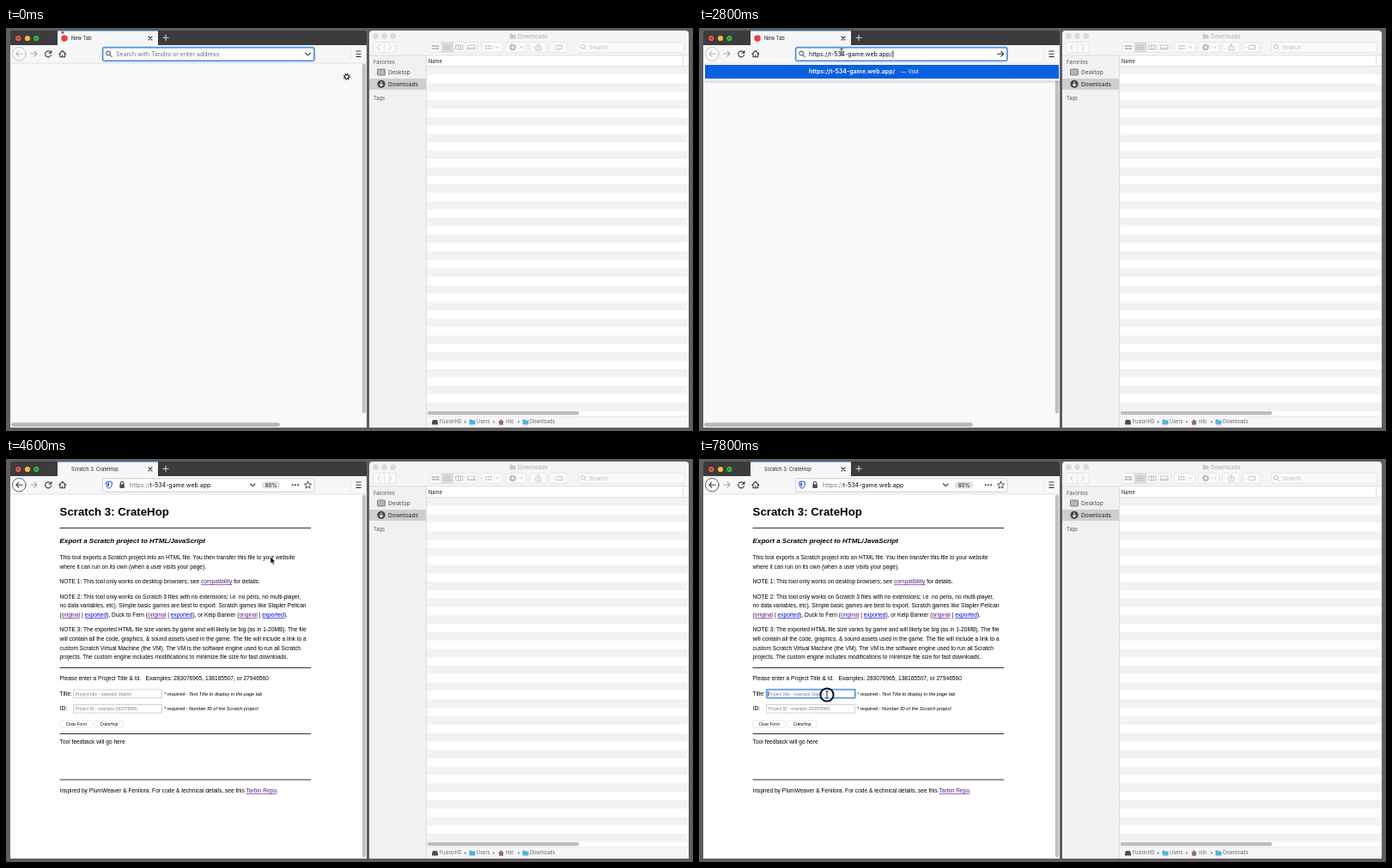
An HTML page that plays this animation: 800x470 px, repeating every 8000 ms.

```html
<!DOCTYPE html>
<html lang="en">
<head>
<meta charset="utf-8">
<title>Browser demo</title>
<style>
html, body { margin: 0; width: 100%; height: 100%; overflow: hidden; background: #5f5d61; }
svg { display: block; width: 100vw; height: 100vh; }
text { font-family: Inter, Roboto, sans-serif; font-size: 7px; fill: #1c1c20; }
.s { font-size: 5.7px; }
.m { font-size: 6.6px; }
.b { font-weight: 600; }
.i { fill: none; stroke: #38383d; stroke-width: 1.1; stroke-linecap: round; stroke-linejoin: round; }
.dim { stroke: #aaa; }
#finder .i { stroke: #bdbdbf; stroke-width: .9; }
#finder .btn { fill: #fbfafb; stroke: #e2e0e2; stroke-width: .8; }
#path text { fill: #666; font-size: 5.6px; }
#page text { font: 6.62px "Liberation Sans", Arial, sans-serif; fill: #000; }
#page .h1 { font-size: 13.24px; font-weight: bold; }
#page .h2 { font-size: 8px; font-weight: bold; font-style: italic; }
#page .req { font-size: 5.55px; font-style: italic; }
#page .ui { font: 4.7px Inter, sans-serif; }
#page .hint { fill: #777; }
.v { fill: #551a8b; text-decoration: underline; }
.u { fill: #00e; text-decoration: underline; }
.box { fill: #fff; stroke: #c8c8c8; stroke-width: .8; }
.rule { stroke: #333; stroke-width: 1; }
</style>
</head>
<body>
<svg viewBox="0 0 800 470" preserveAspectRatio="none">
  <defs>
    <pattern id="rows" y="45" width="20" height="19.6" patternUnits="userSpaceOnUse">
      <rect width="20" height="9.8" fill="#f3f2f3"/>
    </pattern>
    <g id="gear" fill="none">
      <circle r="2.3" stroke-width="1.2"/>
      <circle r="3.5" stroke-width="1.3" stroke-dasharray="1.3 1.449"/>
    </g>
    <g id="folder"><path d="M-3.5 -2.8h2.6l.8 1h3.6v4.8h-7z"/></g>
    <g id="lens"><circle r="2.4" cx="-.8" cy="-.8"/><path d="M1 1l2.4 2.4"/></g>
    <linearGradient id="shade" x2="0" y2="1">
      <stop stop-color="#000" stop-opacity=".16"/><stop offset="1" stop-color="#000" stop-opacity="0"/>
    </linearGradient>
  </defs>

  <rect width="800" height="470" fill="#5f5d61"/>

  <g id="finder">
    <path d="M423 466V7q0-4 4-4H791q4 0 4 4V466z" fill="#f6f5f6"/>
    <g fill="#dcdadc" stroke="#cfcdcf" stroke-width=".6">
      <circle cx="430.5" cy="9.5" r="3"/><circle cx="440.6" cy="9.5" r="3"/><circle cx="450.7" cy="9.5" r="3"/>
    </g>
    <use href="#folder" x="590" y="9.6" fill="#c9c9cb"/>
    <text class="m" x="596" y="12" style="fill:#a9a8aa">Downloads</text>
    <g class="btn">
      <path d="M427.5 16.5h26.5v12h-26.5zM440.7 16.5v12"/>
      <rect x="492.5" y="16.5" width="56.5" height="12" rx="2"/>
      <rect x="507" y="16.5" width="14" height="12" style="fill:#dddbdd"/>
      <path d="M535 16.5v12"/>
      <rect x="553.5" y="16.5" width="24.5" height="12" rx="2"/>
      <rect x="581.5" y="16.5" width="24.5" height="12" rx="2"/>
      <rect x="609.5" y="16.5" width="20.5" height="12" rx="2"/>
      <rect x="633.5" y="16.5" width="20.5" height="12" rx="2"/>
      <rect x="666.5" y="16.5" width="123" height="12" rx="2"/>
    </g>
    <g class="i">
      <path d="M435 19.5l-2.4 3 2.4 3M446 19.5l2.4 3-2.4 3"/>
      <path d="M496.5 21h2.5M501 21h2.5M496.5 24h2.5M501 24h2.5" stroke-width="2"/>
      <path d="M510 20.3h8M510 22.5h8M510 24.7h8"/>
      <path d="M524 20h8v5h-8zM526.7 20v5M529.3 20v5M538 20h8v5h-8zM538 23.6h8"/>
      <path d="M558.5 21h7M558.5 24h7" stroke-width="2" stroke-dasharray="1.4 1.3" stroke-linecap="butt"/>
      <path d="M570.5 21.7l1.6 1.6 1.6-1.6M599 21.7l1.6 1.6 1.6-1.6"/>
      <path d="M617.8 21.5h-.9v4.5h6v-4.5h-.9M619.9 24v-5.2M618.5 20l1.4-1.4 1.4 1.4"/>
      <path d="M639.5 22.5l2-2.3h6v4.6h-6z"/>
      <use href="#lens" x="672.5" y="22.5"/>
    </g>
    <use href="#gear" x="590" y="22.5" stroke="#a9a9ab"/>
    <text class="m" x="679" y="25" style="fill:#bcbbbd">Search</text>

    <rect x="423" y="32" width="66" height="434" fill="#f2f0f2"/>
    <rect x="423" y="59" width="66" height="13" fill="#cfcdcf"/>
    <text class="s" x="428" y="42" style="fill:#6d6c6e;font-weight:500">Favorites</text>
    <rect x="432.5" y="48" width="9" height="7" rx=".8" fill="#b5b4b6" stroke="#6d6c6e" stroke-width=".8"/>
    <text class="m" x="445" y="54.2" style="fill:#4b4a4c">Desktop</text>
    <circle cx="437" cy="65.3" r="4.6" fill="#454446"/>
    <path d="M437 62.6v4.8M434.9 65.6l2.1 2.1 2.1-2.1" fill="none" stroke="#fff" stroke-width="1.1"/>
    <text class="m" x="445" y="67.7" style="fill:#3b3a3c;font-weight:500">Downloads</text>
    <text class="s" x="428" y="84" style="fill:#6d6c6e;font-weight:500">Tags</text>

    <rect x="490" y="32" width="305" height="421" fill="#fff"/>
    <rect x="490" y="45" width="305" height="402" fill="url(#rows)"/>
    <path d="M423 31.8h372M489.5 32v434M788.5 33v11M490 44.7h305M490 453h305" stroke="#dad8da" stroke-width=".8"/>
    <text class="s" x="492" y="40.7">Name</text>
    <rect x="490.5" y="447" width="177" height="4.2" rx="2.1" fill="#bebdbf"/>

    <g id="path">
      <rect x="490" y="453.4" width="305" height="12.6" fill="#f7f6f7"/>
      <path d="M497 457l-1 3v2.5h7V460l-1-3z" fill="#4d4d50"/>
      <text x="505" y="461.4">FusionHD</text>
      <use href="#folder" x="543" y="459.4" fill="#4fb3e2"/>
      <text x="548" y="461.4">Users</text>
      <path d="M573 459.5l3.5-3.2 3.5 3.2h-1v3.2h-5v-3.2z" fill="#a06a70"/>
      <text x="582" y="461.4">nilo</text>
      <use href="#folder" x="605" y="459.4" fill="#4fb3e2"/>
      <text x="610" y="461.4">Downloads</text>
      <path d="M534 457.6l1.8 1.8-1.8 1.8zM567.4 457.6l1.8 1.8-1.8 1.8zM596.4 457.6l1.8 1.8-1.8 1.8z" fill="#777"/>
    </g>
  </g>

  <g id="browser">
    <path d="M5 466V6q0-3 3-3H417q3 0 3 3V466z" fill="#3c3b3e"/>
    <circle cx="14.3" cy="12" r="3.1" fill="#fc5b57"/>
    <circle cx="25" cy="12" r="3.1" fill="#fdbc2e"/>
    <circle cx="35.3" cy="12" r="3.1" fill="#2bc840"/>
    <path d="M13 10.7l2.6 2.6M15.6 10.7l-2.6 2.6" stroke="#7c1614" stroke-width=".8"/>
    <path d="M34 10.7l2.6 2.6M36.6 10.7l-2.6 2.6" stroke="#0b5f16" stroke-width=".8"/>
    <rect x="60" y="3" width="117" height="18" fill="#f5f6f8"/>
    <rect x="60" y="3" width="117" height="1" fill="#7fb4f5"/>
    <path class="i" d="M166 10l4 4M170 10l-4 4"/>
    <path d="M182.5 11.3h7M186 7.8v7" stroke="#d8d8da" stroke-width="1"/>
    <rect x="5" y="20" width="415" height="21" fill="#f7f7f9"/>
    <rect x="5" y="41" width="415" height="425" fill="#f9f9fc"/>

    <g class="i">
      <path class="dim" d="M36 30h-7M33 27l3 3-3 3"/>
      <path d="M61.8 30.3l4-3.8 4 3.8M63 30v3.8h5.6V30M65.8 33.5v-2"/>
      <path d="M407.5 27h6M407.5 30.2h6M407.5 33.4h6" stroke-linecap="butt"/>
    </g>
    <path d="M401.3 22v16" stroke="#e3e3e6" stroke-width=".8"/>
    <g id="back" class="i">
      <circle cx="15.3" cy="30.2" r="7.8" fill="#fbfbfc" stroke-width=".8"/>
      <path d="M19 30.2h-7M14.8 27.2l-3 3 3 3"/>
    </g>
    <path id="reload" class="i" d="M52.4 29a3.5 3.5 0 1 0 .1 2.4M52.8 26.6v2.7h-2.7"/>
    <path id="stop" class="i" d="M46 27l6.4 6.4M52.4 27L46 33.4"/>

    <g id="fresh">
      <circle cx="68" cy="12" r="3.8" fill="#e8433c"/>
      <text class="s" x="76" y="14">New Tab</text>
      <rect x="112" y="22" width="247.5" height="17" rx="2.5" fill="none" stroke="#9cc3f7" stroke-width="1"/>
      <rect x="112.8" y="22.8" width="246" height="15.4" rx="1.8" fill="#fff" stroke="#3079e0" stroke-width="1.2"/>
      <use href="#lens" class="i" x="120" y="30.3" style="stroke:#6b6b70"/>
      <path id="chevron" class="i" d="M348.5 29l3 2.8 3-2.8"/>
      <text id="prompt" x="128" y="32.9" style="fill:#6f6f74">Search with Tandro or enter address</text>
      <use href="#gear" x="396.8" y="56.8" stroke="#2c2c30"/>
      <rect x="414.8" y="41.5" width="4.4" height="408" rx="2.2" fill="#c1c0c3"/>
      <rect x="6" y="460.3" width="313" height="4.6" rx="2.3" fill="#b9b8bb"/>
    </g>

    <g id="typed">
      <path class="i" d="M347.5 30.3h7M351.8 27.5l2.8 2.8-2.8 2.8"/>
      <text x="128" y="32.9" style="fill:#0c0c0d">https://t-534-game.web.app/</text>
      <path id="caret" d="M225.9 26.5v8" stroke="#000" stroke-width=".8"/>
      <rect x="5" y="61" width="415" height="4" fill="url(#shade)"/>
      <rect x="5" y="41" width="415" height="20.5" fill="#f9f9fa"/>
      <rect x="7" y="43" width="412" height="16" fill="#0860dd"/>
      <text class="b" x="128" y="53.4" style="fill:#fff">https://t-534-game.web.app/</text>
      <text x="235.5" y="53.4" style="fill:#fff;font-size:6.2px">— Visit</text>
    </g>

    <g id="site">
      <text class="s" x="76" y="14">Scratch 3: CrateHop</text>
      <rect x="112.5" y="22.8" width="246.5" height="15.4" rx="1.8" fill="#fff" stroke="#c9c9cd" stroke-width=".9"/>
      <path d="M120 26l3.3 1v3q0 3-3.3 4.4-3.3-1.4-3.3-4.4v-3z" fill="#fff" stroke="#2b53d8" stroke-width="1"/>
      <path d="M120 27.6v5q-1.9-1-1.9-2.9v-1.6z" fill="#2b53d8"/>
      <rect x="132.3" y="29.5" width="5.6" height="4.5" rx=".8" fill="#4d4d52"/>
      <path class="i" d="M133.4 29.4v-1.2a1.7 1.7 0 0 1 3.4 0v1.2"/>
      <text x="144" y="32.9" style="fill:#77777c">https://<tspan fill="#0c0c0d">t-534-game.web.app</tspan></text>
      <path class="i" d="M284.5 29l2.8 2.6 2.8-2.6"/>
      <rect x="298" y="26.2" width="21.5" height="8.4" rx="4.2" fill="#e2e2e6"/>
      <text x="308.7" y="32.6" text-anchor="middle" style="font-size:6.2px">80%</text>
      <g fill="#38383d"><circle cx="333.7" cy="30.3" r="1"/><circle cx="336.9" cy="30.3" r="1"/><circle cx="340.1" cy="30.3" r="1"/></g>
      <path class="i" d="M351.5 26.2l1.2 2.7 2.9.3-2.2 2 .7 2.9-2.6-1.5-2.6 1.5.7-2.9-2.2-2 2.9-.3z" style="stroke-width:.9"/>
      <rect x="5" y="41" width="415" height="425" fill="#fff"/>
    </g>

    <g id="loading">
      <circle cx="67.5" cy="12" r="1.5" fill="#1f8ff0"/>
      <text x="198" y="59.6" style="font:5.3px 'Liberation Sans',sans-serif;letter-spacing:.8px;fill:#000">loading...</text>
      <path d="M5 457.3h153.5V466H5z" fill="#f6f6f7" stroke="#c8c8ca" stroke-width=".7"/>
      <text class="s" x="7" y="463.9">Transferring data from t-534-game.web.app...</text>
    </g>

    <g id="page">
      <text class="h1" x="62.6" y="65.8">Scratch 3: CrateHop</text>
      <path class="rule" d="M62.5 80.5h292.5M62.5 243.5h292.5M62.5 320.5h292.5M62.5 374h292.5"/>
      <text class="h2" x="62.6" y="98">Export a Scratch project to HTML/JavaScript</text>
      <text x="62.6" y="117.3">This tool exports a Scratch project into an HTML file. You then transfer this file to your website</text>
      <text x="62.6" y="128">where it can run on its own (when a user visits your page).</text>
      <text x="62.6" y="145.4">NOTE 1: This tool only works on desktop browsers; see <tspan class="v">compatibility</tspan> for details.</text>
      <text x="62.6" y="162.8">NOTE 2: This tool only works on Scratch 3 files with no extensions; i.e. no pens, no multi-player,</text>
      <text x="62.6" y="173.4">no data variables, etc). Simple basic games are best to export. Scratch games like Stapler Pelican</text>
      <text x="62.6" y="184">(<tspan class="v">original</tspan> | <tspan class="u">exported</tspan>), Duck to Fern (<tspan class="v">original</tspan> | <tspan class="u">exported</tspan>), or Kelp Banner (<tspan class="v">original</tspan> | <tspan class="u">exported</tspan>).</text>
      <text x="62.6" y="201.2">NOTE 3: The exported HTML file size varies by game and will likely be big (as in 1-20MB). The file</text>
      <text x="62.6" y="211.9">will contain all the code, graphics, &amp; sound assets used in the game. The file will include a link to a</text>
      <text x="62.6" y="222.6">custom Scratch Virtual Machine (the VM). The VM is the software engine used to run all Scratch</text>
      <text x="62.6" y="233.3">projects. The custom engine includes modifications to minimize file size for fast downloads.</text>
      <text x="62.6" y="258.4">Please enter a Project Title &amp; Id.&nbsp;&nbsp; Examples: 283076965, 138165507, or 27946560</text>
      <text x="62.6" y="275.6">Title:</text>
      <text x="62.6" y="293.2">ID:</text>
      <rect class="box" x="78.7" y="269" width="103" height="9.6"/>
      <rect class="box" x="78.7" y="286.5" width="103" height="9.6"/>
      <g id="focus">
        <rect x="78.7" y="268.8" width="103.2" height="10" rx="1" fill="#fff" stroke="#9cc6f8" stroke-width="2"/>
        <rect x="78.9" y="269" width="102.8" height="9.6" fill="none" stroke="#3d85e6" stroke-width=".9"/>
        <path d="M80.8 270.8v6" stroke="#000" stroke-width=".7"/>
      </g>
      <text class="ui hint" x="81" y="275.6">Project title - example Stapler</text>
      <text class="ui hint" x="81" y="293.1">Project ID - example 283076965</text>
      <text class="req" x="184" y="275.6">* required - Text Title to display in the page tab</text>
      <text class="req" x="184" y="293.1">* required - Number ID of the Scratch project</text>
      <g fill="#fff" stroke="#dedede" stroke-width=".7">
        <rect x="63" y="305" width="37.5" height="7.8" rx="1.6"/><rect x="103" y="305" width="34" height="7.8" rx="1.6"/>
      </g>
      <text class="ui" x="81.8" y="310.7" text-anchor="middle">Clear Form</text>
      <text class="ui" x="120" y="310.7" text-anchor="middle">CrateHop</text>
      <text x="62.6" y="332">Tool feedback will go here</text>
      <text x="62.6" y="389">Inspired by PlumWeaver &amp; Fenilora. For code &amp; technical details, see this <tspan class="v">Tarbin Repo</tspan>.</text>
      <rect x="414.8" y="41.5" width="4.4" height="423" rx="2.2" fill="#c1c0c3"/>
    </g>
    <path id="edge" d="M5 41h415" stroke="#dcdce0" stroke-width=".8"/>
  </g>

  <g id="cursor">
    <circle id="ring" r="7.6" fill="#fff" fill-opacity=".45" stroke="#0b0b1c" stroke-width="2"/>
    <g id="beam" fill="none">
      <path d="M-1.8 -4.2q1.8 0 1.8 1.2V3q0 1.2-1.8 1.2M1.8 -4.2Q0 -4.2 0 -3M1.8 4.2Q0 4.2 0 3" stroke="#fff" stroke-width="1.8" stroke-opacity=".6"/>
      <path d="M-1.8 -4.2q1.8 0 1.8 1.2V3q0 1.2-1.8 1.2M1.8 -4.2Q0 -4.2 0 -3M1.8 4.2Q0 4.2 0 3" stroke="#111" stroke-width=".9"/>
    </g>
    <path id="arrow" d="M0 0v8l1.8-1.6 1.3 2.8 1.4-.6-1.2-2.8h2.4z" fill="#000" stroke="#fff" stroke-width=".6"/>
  </g>
</svg>

<script>
const LOOP = 8000, STEP = 200;
const TYPED = 2200, LOAD = 3000, READY = 3800;

// Pointer path: time, x, y
const route = [
  [0, 66, 2], [1000, 166, 28], [3600, 166, 28], [4600, 308, 114], [4800, 308, 114],
  [5900, 212, 257], [6200, 212, 257], [6700, 250, 257], [7200, 205, 260], [7600, 149, 275]
];

const $ = id => document.getElementById(id);
const show = (id, on) => { $(id).style.display = on ? "" : "none"; };
const within = (t, a, b) => t >= a && t < b;
const ease = p => p * p * (3 - 2 * p);

function pointer(t) {
  const n = route.findIndex(k => k[0] > t);
  if (n < 0) return route[route.length - 1].slice(1);
  const [t0, x0, y0] = route[n - 1], [t1, x1, y1] = route[n];
  const p = ease((t - t0) / (t1 - t0));
  return [x0 + (x1 - x0) * p, y0 + (y1 - y0) * p];
}

function draw(t) {
  const site = t >= LOAD, loading = within(t, LOAD, READY);
  show("fresh", !site);
  show("prompt", t < TYPED);
  show("chevron", t < TYPED);
  show("typed", within(t, TYPED, LOAD));
  show("site", site);
  show("loading", loading);
  show("page", t >= READY);
  show("stop", loading);
  show("reload", !loading);
  show("focus", t >= 7600);
  $("back").style.stroke = site ? "#38383d" : "#b4b4b8";

  const [x, y] = pointer(t);
  const arrow = within(t, READY, 5000);
  $("cursor").setAttribute("transform", `translate(${x.toFixed(2)} ${y.toFixed(2)})`);
  show("cursor", !loading);
  show("arrow", arrow);
  show("beam", !arrow);
  show("ring", within(t, 1600, 1800) || t >= 7600);
}

const start = performance.now();
function tick() {
  const t = (performance.now() - start) % LOOP;
  draw(Math.floor(t / STEP) * STEP);
  requestAnimationFrame(tick);
}
draw(0);
requestAnimationFrame(tick);
</script>
</body>
</html>
```
